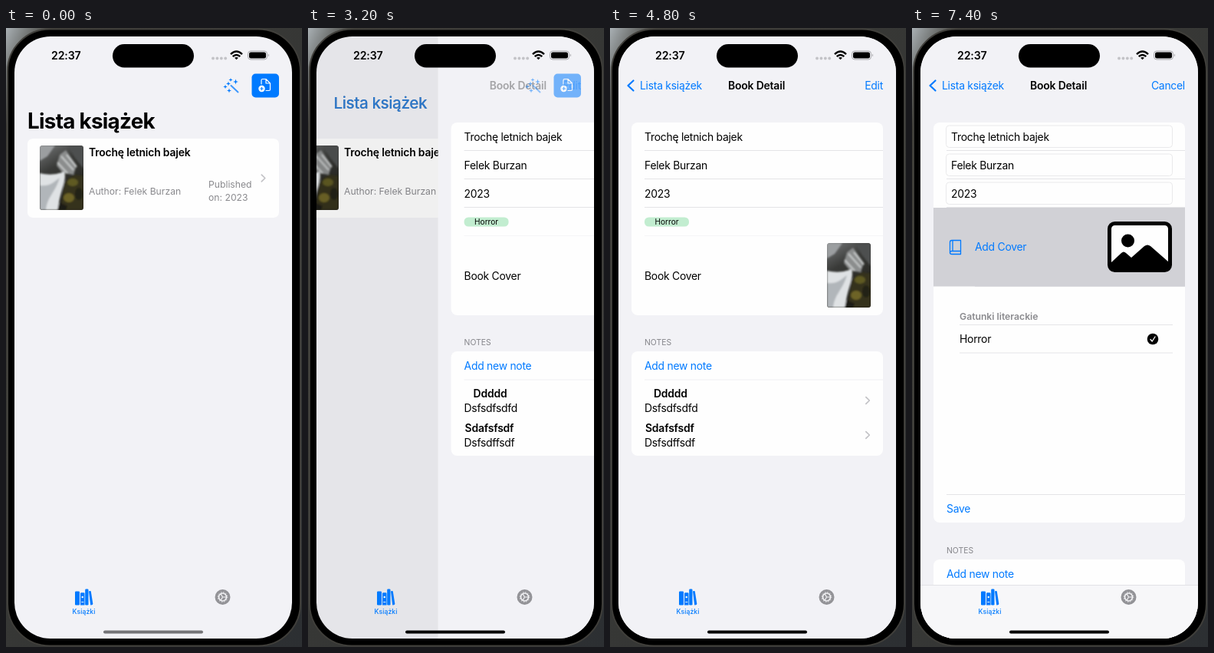
Write an HTML page that moves like this. It is 386 px wide and 806 px high and loops after 8000 ms.

```html
<!DOCTYPE html>
<html lang="pl">
<head>
<meta charset="utf-8">
<title>Lista książek</title>
<style>
  html, body { margin: 0; width: 100%; height: 100%; overflow: hidden; background: #2b2b2a; }
  svg { display: block; width: 100vw; height: 100vh; }
  text { font: 13.9px Inter, "Liberation Sans", sans-serif; letter-spacing: -.018em; fill: #000; }
  .semi { font-weight: 600; letter-spacing: -.012em; }
  .sub { font-size: 12.2px; letter-spacing: 0; fill: #8a8a8e; }
  .head { font-size: 10.4px; letter-spacing: 0; fill: #85858a; }
  .badge { font-size: 10.1px; letter-spacing: 0; }
  .tab { font-size: 8.6px; font-weight: 500; letter-spacing: .01em; }
  #title text { font-size: inherit; font-weight: inherit; letter-spacing: inherit; }
  .link { fill: #007aff; }
  .end { text-anchor: end; }
  .mid { text-anchor: middle; }
  .card { fill: #fefefe; }
  .rule { stroke: #dedee1; stroke-width: .8; fill: none; }
  .field { stroke: #e9e9eb; stroke-width: 1; fill: none; }
  .chevron { stroke: #c2c2c6; stroke-width: 1.7; fill: none; stroke-linecap: round; stroke-linejoin: round; }
  .line { fill: none; stroke-linecap: round; stroke-linejoin: round; }
</style>
</head>
<body>
<svg viewBox="0 0 386 806" preserveAspectRatio="none">
  <defs>
    <clipPath id="screen"><rect x="11" y="11" width="362" height="784" rx="47"/></clipPath>
    <clipPath id="coverEdge"><rect width="57" height="84" rx="3.5"/></clipPath>
    <linearGradient id="rock" x2=".4" y2="1">
      <stop offset="0" stop-color="#77797a"/>
      <stop offset=".4" stop-color="#393a38"/>
      <stop offset="1" stop-color="#1f1e17"/>
    </linearGradient>
    <linearGradient id="desk" x2="1" y2="1">
      <stop offset="0" stop-color="#a9b0b4"/>
      <stop offset=".08" stop-color="#3f3e38"/>
      <stop offset="1" stop-color="#2c2f32"/>
    </linearGradient>
    <filter id="soft"><feGaussianBlur stdDeviation="1.3"/></filter>
    <g id="cover" clip-path="url(#coverEdge)">
      <rect width="57" height="84" fill="url(#rock)"/>
      <g filter="url(#soft)">
        <path d="M0 0H20L10 14 0 20Z" fill="#9b9ea0"/>
        <path d="M36 0H57V30L46 16Z" fill="#4e504f"/>
        <path d="M26 12 34 6 48 26 44 38 30 36 22 26Z" fill="#8b8d8d"/>
        <path d="M28 14 44 32M35 12 48 28M23 22 36 36" stroke="#c4c7c7" stroke-width="2"/>
        <path d="M0 36C16 40 26 36 32 34 36 46 26 58 24 84H0Z" fill="#dfe2e4"/>
        <path d="M0 52C14 54 20 46 26 42 20 62 10 66 8 84H0Z" fill="#b1b6ba"/>
        <path d="M32 48 44 38 57 40V84H27Z" fill="#36331a"/>
        <ellipse cx="43" cy="48" rx="7" ry="5" fill="#5f5a24"/>
        <ellipse cx="38" cy="68" rx="7" ry="6" fill="#6d6426"/>
        <ellipse cx="51" cy="63" rx="5" ry="8" fill="#242216"/>
        <path d="M26 74 36 79 34 84H23Z" fill="#1c1b14"/>
      </g>
    </g>
    <path id="more" class="chevron" d="M-2.2-4.4 2.3 0-2.2 4.4"/>
  </defs>

  <rect width="386" height="806" fill="url(#desk)"/>
  <rect x="2" y="1.5" width="382" height="803" rx="55" fill="#000" stroke="#403f3b" stroke-width="2"/>

  <g clip-path="url(#screen)">
    <rect width="386" height="806" fill="#f2f2f6"/>

    <g id="list">
      <rect class="card" x="28" y="144" width="328" height="103" rx="7"/>
      <rect id="rowTap" x="28" y="144" width="328" height="103" rx="7" fill="#d1d1d6"/>
      <use href="#cover" x="44" y="153"/>
      <text class="semi" x="108" y="167">Trochę letnich bajek</text>
      <text class="sub" x="108" y="216.500">Author: Felek Burzan</text>
      <text class="sub" x="264" y="208">Published</text>
      <text class="sub" x="264" y="225">on: 2023</text>
      <use href="#more" x="335.500" y="195.500"/>
    </g>
    <rect id="dim" width="386" height="806"/>

    <g id="detail">
      <rect x="11" width="362" height="806" fill="#f2f2f6"/>
      <g id="view">
        <rect class="card" x="28" y="123" width="328" height="251" rx="8"/>
        <path class="rule" d="M45 159.500H356M45 196.500H356M45 233.500H356"/>
        <path class="rule" d="M45 270.500H356" opacity=".35"/>
        <text x="45" y="146.500">Trochę letnich bajek</text>
        <text x="45" y="183.500">Felek Burzan</text>
        <text x="45" y="220.500">2023</text>
        <rect x="45" y="246.500" width="58" height="12" rx="5.500" fill="#c2edd0"/>
        <text class="badge mid" x="74" y="256.200">Horror</text>
        <text x="45" y="327.500">Book Cover</text>
        <use href="#cover" x="283" y="280"/>
        <text class="head" x="45" y="413">NOTES</text>
        <rect class="card" x="28" y="421" width="328" height="136" rx="8"/>
        <path class="rule" d="M45 458H356" opacity=".5"/>
        <text class="link" x="45" y="444.500">Add new note</text>
        <text class="semi" x="57" y="481">Ddddd</text>
        <text x="45" y="500">Dsfsdfsdfd</text>
        <text class="semi" x="46" y="525.500">Sdafsfsdf</text>
        <text x="45" y="544.500">Dsfsdffsdf</text>
        <use href="#more" x="336" y="485"/>
        <use href="#more" x="336" y="530"/>
      </g>
      <g id="edit">
        <rect class="card" x="28" y="123" width="328" height="521" rx="8"/>
        <path class="rule" d="M45 159.500H356M45 196.500H356M45 233.500H356M82 336.500H356M62 386.500H340M62 423H340M45 607.500H356"/>
        <rect class="field" x="44.500" y="127" width="295" height="28.500" rx="4"/>
        <rect class="field" x="44.500" y="164" width="295" height="28.500" rx="4"/>
        <rect class="field" x="44.500" y="201" width="295" height="28.500" rx="4"/>
        <text x="51" y="146.500">Trochę letnich bajek</text>
        <text x="51" y="183.500">Felek Burzan</text>
        <text x="51" y="220.500">2023</text>
        <rect id="coverTap" x="28" y="234" width="328" height="102.500" fill="#d1d1d6"/>
        <path class="line" d="M52 276.500H63.500V290.500H52Q49.500 290.500 49.500 292.500T52 294.500H63.500V290.500M49.500 292.500V279Q49.500 276.500 52 276.500M53 277V290" stroke="#007aff" stroke-width="1.300"/>
        <text class="link" x="82" y="290">Add Cover</text>
        <rect x="257.500" y="254.500" width="79" height="61" rx="7" fill="#fefefe" stroke="#000" stroke-width="5"/>
        <circle cx="281.500" cy="277" r="8.500"/>
        <path d="M259 306 273 293Q276 290 279 293L286 299 303 284Q307 281 311 284L335 305V314H259Z"/>
        <text class="sub semi" x="62" y="379.500">Gatunki literackie</text>
        <text x="62" y="410">Horror</text>
        <circle cx="314" cy="405" r="7.300"/>
        <path class="line" d="M311 405.500 313.200 408 317 402" stroke="#fff" stroke-width="1.300"/>
        <text class="link" x="45" y="631">Save</text>
        <text class="head" x="45" y="684">NOTES</text>
        <rect class="card" x="28" y="692" width="328" height="136" rx="8"/>
        <text class="link" x="45" y="715.500">Add new note</text>
        <rect x="11" y="725" width="362" height="81" fill="#f7f7f9"/>
        <path class="rule" d="M11 725.500H373"/>
      </g>
    </g>

    <g id="title">
      <text id="titleBlack">Lista książek</text>
      <text id="titleBlue" class="link">Lista książek</text>
    </g>
    <path id="back" class="line" d="M30.500 68.500 23.500 75 30.500 81.500" stroke="#007aff" stroke-width="2.200"/>
    <text id="heading" class="semi" y="80">Book Detail</text>
    <text id="action" class="link end" x="356" y="80"></text>

    <g id="tools">
      <rect x="320.500" y="59.500" width="35.500" height="31" rx="5" fill="#007aff"/>
      <g class="line" stroke="#fff" stroke-width="1.200">
        <path d="M333 73V68Q333 66.500 334.500 66.500H339L344.500 72V80Q344.500 81.500 343 81.500H339M339 66.500V72H344.500"/>
        <circle cx="333.500" cy="79" r="3.600" fill="#fff"/>
        <path d="M331.700 79H335.300M333.500 77.200V80.800" stroke="#007aff" stroke-width="1"/>
      </g>
      <path class="line" d="M293.500 75 302.500 83.500" stroke="#007aff" stroke-width="2" opacity=".75"/>
      <path id="sparkles" fill="#007aff"/>
    </g>

    <g fill="#007aff">
      <rect x="90" y="733.500" width="6" height="18" rx="1.200"/>
      <path d="M97 736.500Q97 735.300 98.200 735.300H101.300Q102.500 735.300 102.500 736.500V751.500H97Z"/>
      <rect x="103.200" y="730.500" width="4.300" height="21" rx="1.200"/>
      <path d="M108 733.500 109.500 733Q110.500 732.800 110.800 733.800L113.300 749.500Q113.400 751 112 751.300L110.200 751.600Z"/>
      <circle cx="99.700" cy="741" r="1.300" fill="#f4f4f8"/>
      <path d="M98.200 747.500H101.300" stroke="#f4f4f8" stroke-width="1"/>
    </g>
    <text class="tab link mid" x="101.500" y="763">Książki</text>
    <circle cx="282.500" cy="741" r="10" fill="#939397"/>
    <g fill="none" stroke="#f4f4f6">
      <circle cx="282.500" cy="741" r="5" stroke-width="1.600"/>
      <circle cx="282.500" cy="741" r="6.300" stroke-width="1" stroke-dasharray="1.3 2"/>
      <path d="M282.500 741H287M282.500 741 280.200 737M282.500 741 280.200 745" stroke-width="1.200"/>
    </g>

    <rect x="139" y="21" width="106" height="30.500" rx="15.250"/>
    <text class="semi" x="59" y="41" style="font-size:14.2px">22:37</text>
    <g fill="#c3c3c7">
      <circle cx="270" cy="39.500" r="1.900"/><circle cx="275.400" cy="39.500" r="1.900"/>
      <circle cx="280.800" cy="39.500" r="1.900"/><circle cx="286.200" cy="39.500" r="1.900"/>
    </g>
    <g fill="none" stroke="#000" stroke-width="2.400">
      <path d="M293 34.200Q300.500 27 308 34.200M295.700 37.200Q300.500 32.800 305.300 37.200"/>
      <path d="M298 38.800Q300.500 37 303 38.800L300.500 41.200Z" fill="#000" stroke="none"/>
    </g>
    <rect x="315.500" y="30" width="25" height="11" rx="3.600" fill="none" stroke="#a5a5a9"/>
    <rect x="317" y="31.500" width="22" height="8" rx="2.300"/>
    <path d="M342 33.500Q344 35.500 342 37.500Z" fill="#a5a5a9"/>
    <rect id="home" x="127" y="784.500" width="130" height="4" rx="2"/>
  </g>
</svg>

<script>
const LOOP = 8000, STEP = 200, WIDTH = 362;
const PUSH_START = 3076, PUSH_END = 4000, STIFFNESS = 0.0152;
const EDIT_AT = 6200, CANCEL_AT = 6800, COVER_TAP_AT = 7400;

const $ = id => document.getElementById(id);
const fade = (id, a) => $(id).setAttribute('opacity', Math.max(0, Math.min(1, a)));
const move = (id, x, y = 0) => $(id).setAttribute('transform', `translate(${x} ${y})`);
const mix = (a, b, k) => a + (b - a) * k;

const star = ([x, y, r]) => {
  const c = r * 0.25;
  return `M${x} ${y - r}L${x + c} ${y - c} ${x + r} ${y} ${x + c} ${y + c} ${x} ${y + r}` +
         ` ${x - c} ${y + c} ${x - r} ${y} ${x - c} ${y - c}Z`;
};
$('sparkles').setAttribute('d',
  [[290, 72.5, 3], [293, 67.5, 2.6], [299.5, 70, 3.4], [286, 76.5, 2.8], [291, 81.5, 3]].map(star).join(''));

// Critically damped spring, 0 to 1
function push(t) {
  if (t >= PUSH_END) return 1;
  const k = Math.max(0, t - PUSH_START) * STIFFNESS;
  return 1 - (1 + k) * Math.exp(-k);
}

// The large title shrinks into the back label
function drawTitle(q) {
  const size = mix(27.8, 13.9, q), style = $('title').style;
  move('title', mix(28, 39, q), mix(130.5, 80, q));
  style.fontSize = size + 'px';
  style.fontWeight = Math.round(mix(700, 400, q));
  style.letterSpacing = mix(-0.026, -0.018, q) * size + 'px';
  fade('titleBlack', 1 - q);
  fade('titleBlue', q * 1.2);
}

function draw(t) {
  const p = push(t), editing = t >= EDIT_AT;

  move('list', -0.3 * WIDTH * p);
  move('detail', WIDTH * (1 - p));
  fade('dim', 0.1 * p);
  fade('rowTap', t >= 3000 && t < 3200 ? 1 : 0);

  drawTitle(p ** 1.18);
  fade('back', (p - 0.7) / 0.3);
  $('heading').setAttribute('x', 154 + 189 * (1 - p));
  fade('heading', p * p);
  fade('tools', 1 - p ** 1.3);

  $('action').textContent = editing ? 'Cancel' : 'Edit';
  fade('action', editing && t < CANCEL_AT ? 0.25 : p * p);
  fade('view', editing ? 0 : 1);
  fade('edit', editing ? 1 : 0);
  fade('coverTap', t >= COVER_TAP_AT ? 1 : 0);
  $('home').setAttribute('fill', t < 3200 ? '#747477' : '#000');
}

function tick() {
  const t = performance.now() % LOOP;
  draw(Math.floor(t / STEP) * STEP);
  requestAnimationFrame(tick);
}
tick();
</script>
</body>
</html>
```
